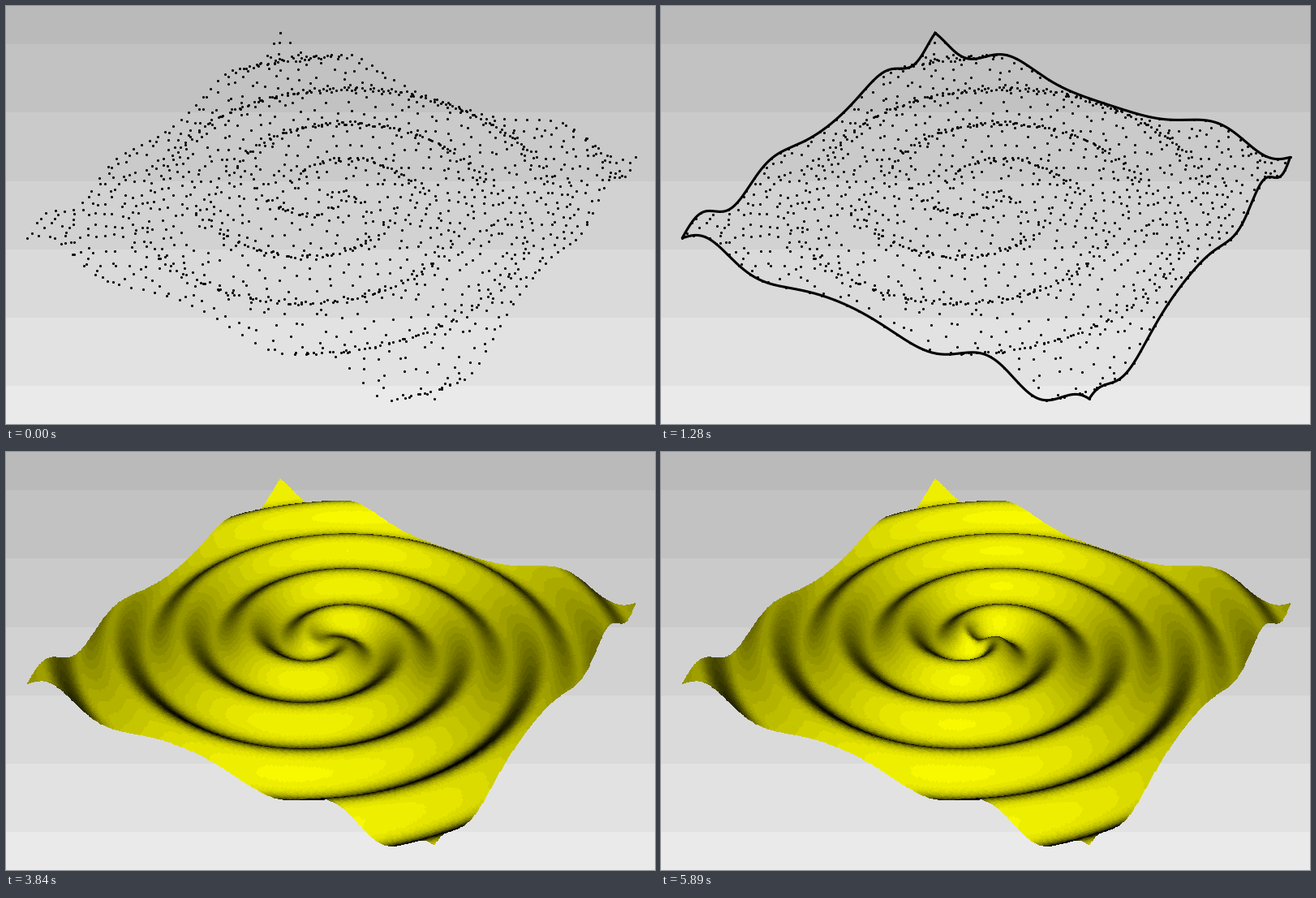
Recreate the animation shown at these times as a matplotlib script. Size 800 px wide and 515 px high, loop 6.4 s.

```python
import numpy as np
import matplotlib.pyplot as plt
from matplotlib.animation import ArtistAnimation
from matplotlib.colors import LinearSegmentedColormap

W, H, DPI = 800, 515, 100
PX = 72 / DPI

# Ground plane in wavelengths: s runs right, t runs towards the viewer.
TOP, RIGHT = np.array([-0.783, -4.42]), np.array([4.67, -1.02])
LEFT, BOTTOM = np.array([-4.21, 0.98]), np.array([1.322, 4.40])
SIDE = 6.45
CX, CY = 395, 233.6
SCALE_X, SCALE_Y, DEPTH = 84.5, 50.3, 0.0362
LIFT = 11.5
VIEW_T, VIEW_Z = 0.804, 0.595
AMPLITUDE = LIFT / (SCALE_X * VIEW_T)


def ground(u, v):
    u, v = np.asarray(u)[..., None], np.asarray(v)[..., None]
    p = (1 - v) * ((1 - u) * TOP + u * RIGHT) + v * ((1 - u) * LEFT + u * BOTTOM)
    return p[..., 0], p[..., 1]


def spiral(s, t, core=0.12):
    r = np.hypot(s, t)
    angle = np.arctan2(s, -t)
    wave = np.sin(2 * np.pi * (r - 0.38) - 2 * angle)
    return wave * (1 - np.exp(-(r / core) ** 2))


def rim(u, v):
    """One along the border, fading to nothing inside."""
    inner = 1
    for d in (u, 1 - u, v, 1 - v):
        inner = inner * (1 - np.exp(-(SIDE * d / 0.8) ** 1.4))
    return 1 - inner


def project(s, t, z):
    w = 1 - DEPTH * t
    return CX + SCALE_X * s / w, CY + (SCALE_Y * t - LIFT * z) / w


def trace(u, v):
    s, t = ground(u, v)
    return project(s, t, spiral(s, t))


def perimeter(n):
    a = np.arange(n) / n
    zero, one = np.zeros(n), np.ones(n)
    u = np.concatenate([a, one, 1 - a, zero, [0]])
    v = np.concatenate([zero, a, one, 1 - a, [0]])
    return u, v


fig = plt.figure(figsize=(W / DPI, H / DPI), dpi=DPI)
ax = fig.add_axes([0, 0, 1, 1])
ax.axis("off")

edges = [0] + [round(47 + 84.25 * i) for i in range(6)] + [H]
for i, (y0, y1) in enumerate(zip(edges, edges[1:])):
    ax.axhspan(y0, y1, color=str((186 + 8 * i) / 255), lw=0, antialiased=False)


def cloud(n=38, per_edge=32):
    rng = np.random.default_rng(8)
    cells = np.array(np.meshgrid(np.arange(n), np.arange(n)))
    inner = (cells + 0.5 + rng.uniform(-0.4, 0.4, cells.shape)) / n
    u, v = perimeter(per_edge)
    x, y = trace(np.append(inner[0], u), np.append(inner[1], v))
    return ax.plot(x, y, "o", color="black", ms=3.1 * PX, mew=0, zorder=2)[0]


def border():
    x, y = trace(*perimeter(200))
    return ax.plot(x, y, color="black", lw=3.1 * PX, zorder=3,
                   solid_joinstyle="round")[0]


yellow = LinearSegmentedColormap.from_list("yellow", ["#000000", "#f8f800"])


def surface(inside, core=0.18, n=250):
    """Shaded wave; `inside` is its relative height away from the border."""
    # Rows run from back to front, so nearer cells cover farther ones.
    u, v = np.meshgrid(np.linspace(0, 1, n), np.linspace(0, 1, n))
    s, t = ground(u, v)
    z = spiral(s, t, core) * (inside + (1 - inside) * rim(u, v))
    pos = np.stack([s, t, AMPLITUDE * z], axis=-1)
    normal = np.cross(np.gradient(pos, axis=1), np.gradient(pos, axis=0))
    normal /= np.linalg.norm(normal, axis=-1, keepdims=True)
    light = np.clip(normal @ np.array([0, VIEW_T, VIEW_Z]), 0, 1)
    cell = (light[1:, 1:] + light[:-1, :-1] + light[1:, :-1] + light[:-1, 1:]) / 4
    x, y = project(s, t, z)
    return ax.pcolormesh(x, y, np.round(cell * 25) / 25, cmap=yellow,
                         vmin=0, vmax=1, shading="flat", zorder=2)


dots, outline = cloud(), border()
stages = [
    [dots],
    [dots, outline],
    [surface(0.03)],
    [surface(0.8, core=0.35)],
    [surface(0.87)],
]
ax.set_xlim(0, W)
ax.set_ylim(H, 0)

anim = ArtistAnimation(fig, stages, interval=1280, repeat=True,
                       repeat_delay=0, blit=False)
plt.show()
```
